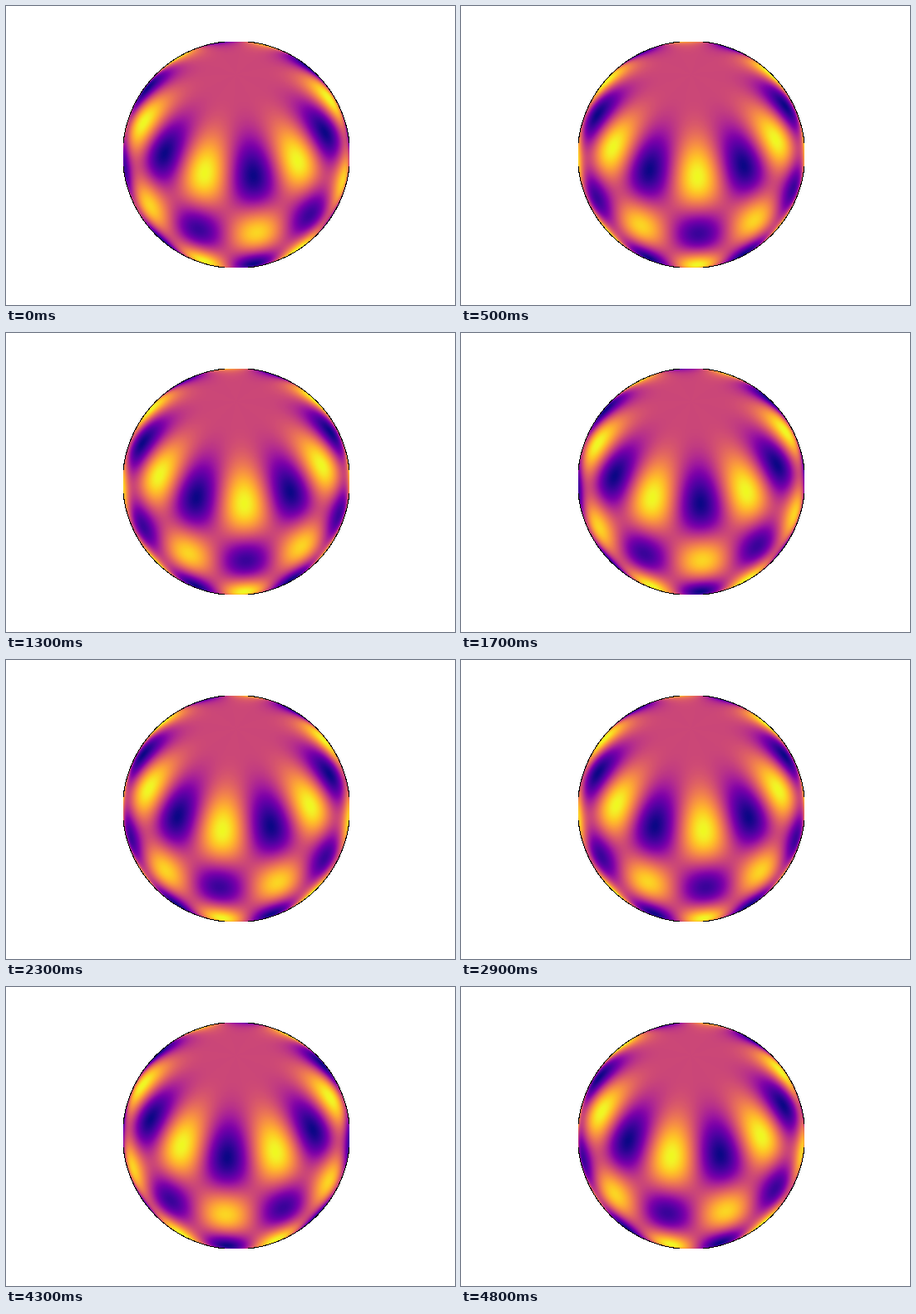
Animation of 540 by 360 pixels, one loop 4900 ms. Source, as a matplotlib script:

```python
import numpy as np
import matplotlib.pyplot as plt
from matplotlib.animation import FuncAnimation

W, H, DPI = 540, 360, 100
FRAMES, INTERVAL = 49, 100
CX, CY, R = 277, 179, 136
LIMB = 136.2    # inner radius of the one-pixel outline
TILT = np.radians(45)
ORDER = 6
START = 10.45   # longitude of a trough at the first frame, degrees
CELL = 0.45     # half a grid cell, degrees

# Orthographic view of the sphere, one sample per pixel
axis = np.arange(2 * R) + 0.5 - R
x, y = np.meshgrid(axis, -axis)
dist = np.hypot(x, y)
scale = np.maximum(dist, R)
x, y = x / scale, y / scale
z = np.sqrt(np.clip(1 - x**2 - y**2, 0, 1))
lat = np.arcsin(np.clip(y * np.cos(TILT) + z * np.sin(TILT), -1, 1))
lon = np.arctan2(x, z * np.cos(TILT) - y * np.sin(TILT))

# Latitude part of the harmonic with degree 8 and order 6
s = np.sin(lat - np.radians(CELL))
band = (1 - s**2) ** 3 * (15 * s**2 - 1)
PEAK = 0.7**3 * 3.5
plasma = plt.get_cmap("plasma")


def globe(i):
    phase = np.radians(START - 360 * i / FRAMES)
    wave = -band * np.cos(ORDER * (lon - phase))
    rgb = plasma(0.5 + 0.5 * wave / PEAK)[..., :3]
    rgb[dist >= LIMB] = 0
    rgb[dist >= LIMB + 1] = 1
    return rgb


fig = plt.figure(figsize=(W / DPI, H / DPI), dpi=DPI, facecolor="white")
ax = fig.add_axes([0, 0, 1, 1])
image = ax.imshow(globe(0), extent=(CX - R, CX + R, CY + R, CY - R),
                  interpolation="nearest", aspect="auto")
ax.set_xlim(0, W)
ax.set_ylim(H, 0)
ax.axis("off")


def update(i):
    image.set_data(globe(i))
    return [image]


anim = FuncAnimation(fig, update, frames=FRAMES, interval=INTERVAL,
                     repeat=True, repeat_delay=0)
plt.show()
```
